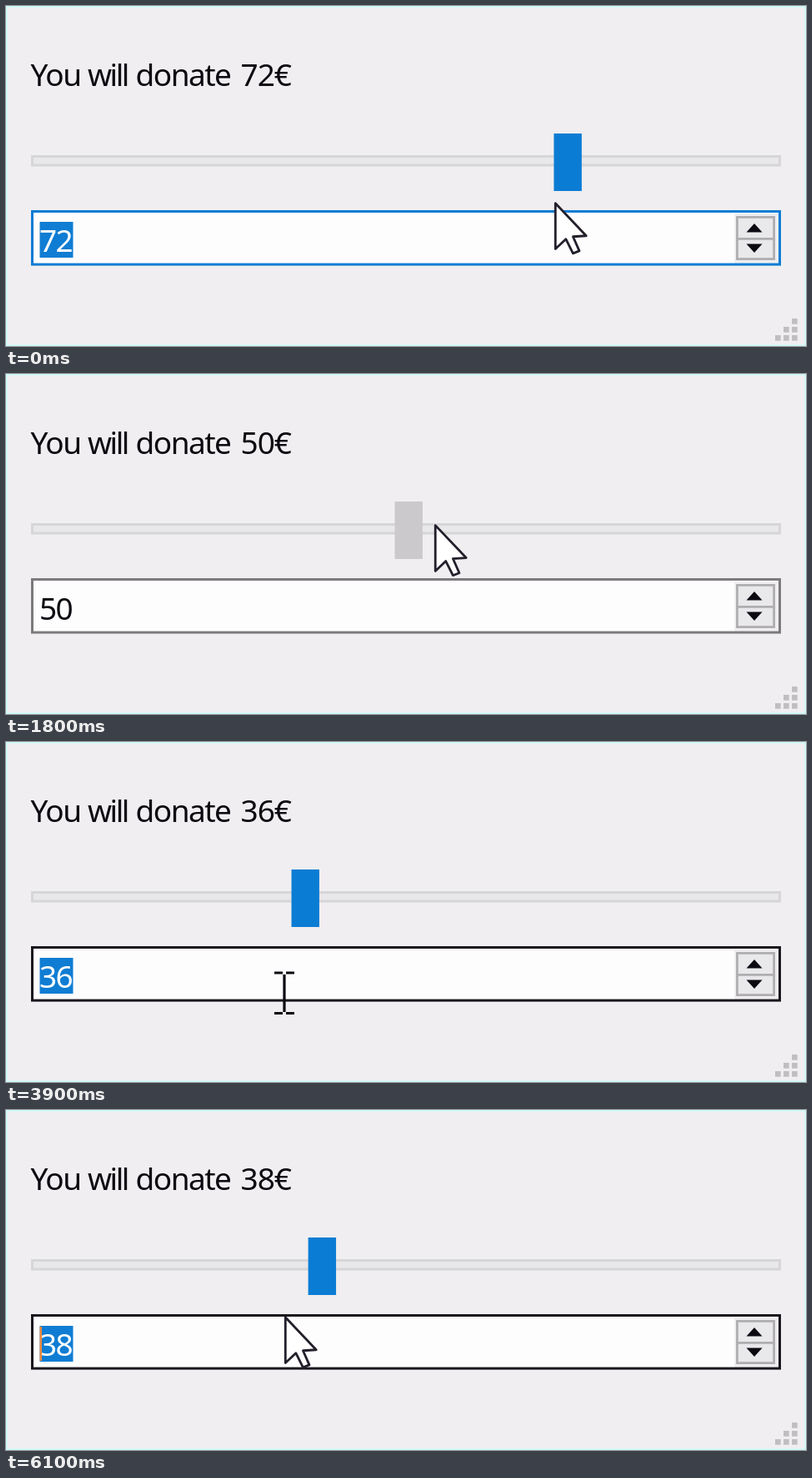
Recreate the animation shown at these times as an HTML page with a canvas. Size 960 by 408 pixels, loop 6.2 s.

```html
<!DOCTYPE html>
<html lang="en">
<head>
<meta charset="utf-8">
<title>Donation slider</title>
<style>
html, body { margin: 0; width: 100%; height: 100%; overflow: hidden; background: #f0eef0; }
canvas { display: block; width: 960px; height: 408px; }
</style>
</head>
<body>
<canvas id="stage" width="960" height="408"></canvas>
<script>
const ctx = document.getElementById('stage').getContext('2d');
const LOOP = 6200, STEP = 100, PX = 3.35;
const PRESS = 350, RELEASE = 3350, SCROLL = 3860, LEAVE = 6050;
const PAPER = '#f0eef0', INK = '#0c0910';
const BLUE = [11, 124, 212], PALE = [203, 201, 204];
const GREY = [125, 122, 126], DARK = [26, 23, 30];

// turning points of the pointer: time, x, y
const POINTER = [
  [0, 658, 236], [PRESS, 674, 202], [950, 352, 205], [1260, 322, 184],
  [2300, 684, 178], [2500, 694, 178], [3300, 350, 187], [3500, 341, 317],
  [3700, 334, 301], [6000, 334, 301], [6100, 334, 248]
];
// wheel scrolling: time, value
const WHEEL = [[SCROLL, 35], [5200, 59], [5500, 51], [5600, 51], [6100, 38]];

const linear = k => k;
const smooth = k => (1 - Math.cos(Math.PI * k)) / 2;

function track(keys, t, ease, col = 1) {
  const i = keys.findIndex(key => key[0] >= t);
  if (i < 1) return keys[i ? keys.length - 1 : 0][col];
  const a = keys[i - 1], b = keys[i];
  return a[col] + (b[col] - a[col]) * ease((t - a[0]) / (b[0] - a[0]));
}

function fade(a, b, t, from, length) {
  const k = Math.min(1, Math.max(0, (t - from) / length));
  return `rgb(${a.map((v, i) => Math.round(v + (b[i] - v) * k))})`;
}

// the handle trails the pointer by half a step
function valueAt(t) {
  if (t > RELEASE) return Math.round(track(WHEEL, t, linear));
  const x = track(POINTER, Math.max(t - STEP / 2, PRESS), smooth) - 47;
  return Math.round(x / PX * 99 / 258);
}

function fill(color, x, y, w, h) {
  ctx.fillStyle = color;
  ctx.fillRect(x, y, w, h);
}

function frame(color, width, x, y, w, h) {
  ctx.strokeStyle = color;
  ctx.lineWidth = width;
  ctx.strokeRect(x + width / 2, y + width / 2, w - width, h - width);
}

function polygon(color, points) {
  ctx.beginPath();
  points.forEach(([x, y]) => ctx.lineTo(x, y));
  ctx.closePath();
  ctx.fillStyle = color;
  ctx.fill();
}

function text(str, x, y, spacing, color) {
  ctx.font = '37px "Noto Sans", "Open Sans", sans-serif';
  ctx.letterSpacing = spacing + 'px';
  ctx.fillStyle = color;
  ctx.fillText(str, x, y);
}

function arrowCursor(x, y) {
  const shape = [[0, 0], [0, 16.6], [3.8, 13], [6.4, 18.2], [8.7, 17.3], [6.4, 12.1], [11.2, 11.8]];
  ctx.lineJoin = 'round';
  polygon('#fff', shape.map(([a, b]) => [x + 1.3 + a * 3.3, y + 0.8 + b * 3.3]));
  ctx.strokeStyle = '#231f2b';
  ctx.lineWidth = 2.8;
  ctx.stroke();
  ctx.lineJoin = 'miter';
}

function beamCursor(x, y) {
  fill(INK, x - 1.6, y - 22, 3.2, 45);
  for (const edge of [-25.5, 23]) {
    fill(INK, x - 12, y + edge, 10, 3);
    fill(INK, x + 2, y + edge, 10, 3);
  }
}

function spinButtons() {
  fill(PAPER, 874, 249, 53, 60);
  fill('#e9e8ea', 877, 253, 44, 51);
  frame('#b0aeb1', 2.8, 876, 252, 47, 53);
  fill('#b0aeb1', 877, 278, 45, 2.8);
  polygon(INK, [[898, 261], [907.5, 271.5], [888.5, 271.5]]);
  polygon(INK, [[888.5, 285.5], [907.5, 285.5], [898, 296]]);
}

function draw(t) {
  const value = valueAt(t);
  const dragging = t < RELEASE;
  const selected = t < PRESS || t > SCROLL;

  ctx.filter = 'none';
  fill(PAPER, 0, 0, 960, 408);
  frame('#cdfaf9', 1.6, 0, 0, 960, 408);

  // the window is seen slightly soft
  ctx.filter = 'blur(0.6px)';
  text('You', 29.5, 95.5, -1.4, INK);
  text('will', 98, 95.5, -2.5, INK);
  text('donate', 155.5, 95.5, -1.5, INK);
  text(value + '€', 281.5, 95.5, -1, INK);

  fill('#e8e7e9', 30, 179, 900, 13.5);
  frame('#d6d5d8', 3, 30, 179, 900, 13.5);

  const left = 31 + PX * Math.floor(value * 258 / 99);
  const knob = dragging
    ? fade(BLUE, PALE, t, PRESS - 50, 300)
    : fade(PALE, BLUE, t, RELEASE - 50, 200);
  fill(knob, left, 153, 33.4, 69);

  const edge = dragging
    ? fade(BLUE, GREY, t, PRESS, 500)
    : fade(GREY, DARK, t, RELEASE - 50, 200);
  fill('#fefdfe', 31, 246, 898, 65);
  spinButtons();
  frame(edge, 3, 30, 245, 900, 66.6);

  if (selected) fill('#0f7dd3', 40.5, 259, 40, 43);
  text(String(value), 40, 294.7, -1.6, selected ? '#fff' : INK);
  if (t > LEAVE) fill('#f08a3c', 40.5, 260, 2.5, 41);

  for (let row = 0; row < 3; row++)
    for (let col = 2 - row; col < 3; col++)
      fill('#c0bec1', 923 + col * 10, 375 + row * 10, 6.7, 6.7);

  const cursor = dragging || t > LEAVE ? arrowCursor : beamCursor;
  cursor(track(POINTER, t, smooth), track(POINTER, t, smooth, 2));
}

const start = performance.now();
function tick() {
  const t = (performance.now() - start) % LOOP;
  draw(Math.floor(t / STEP) * STEP);
  requestAnimationFrame(tick);
}
tick();
</script>
</body>
</html>
```
